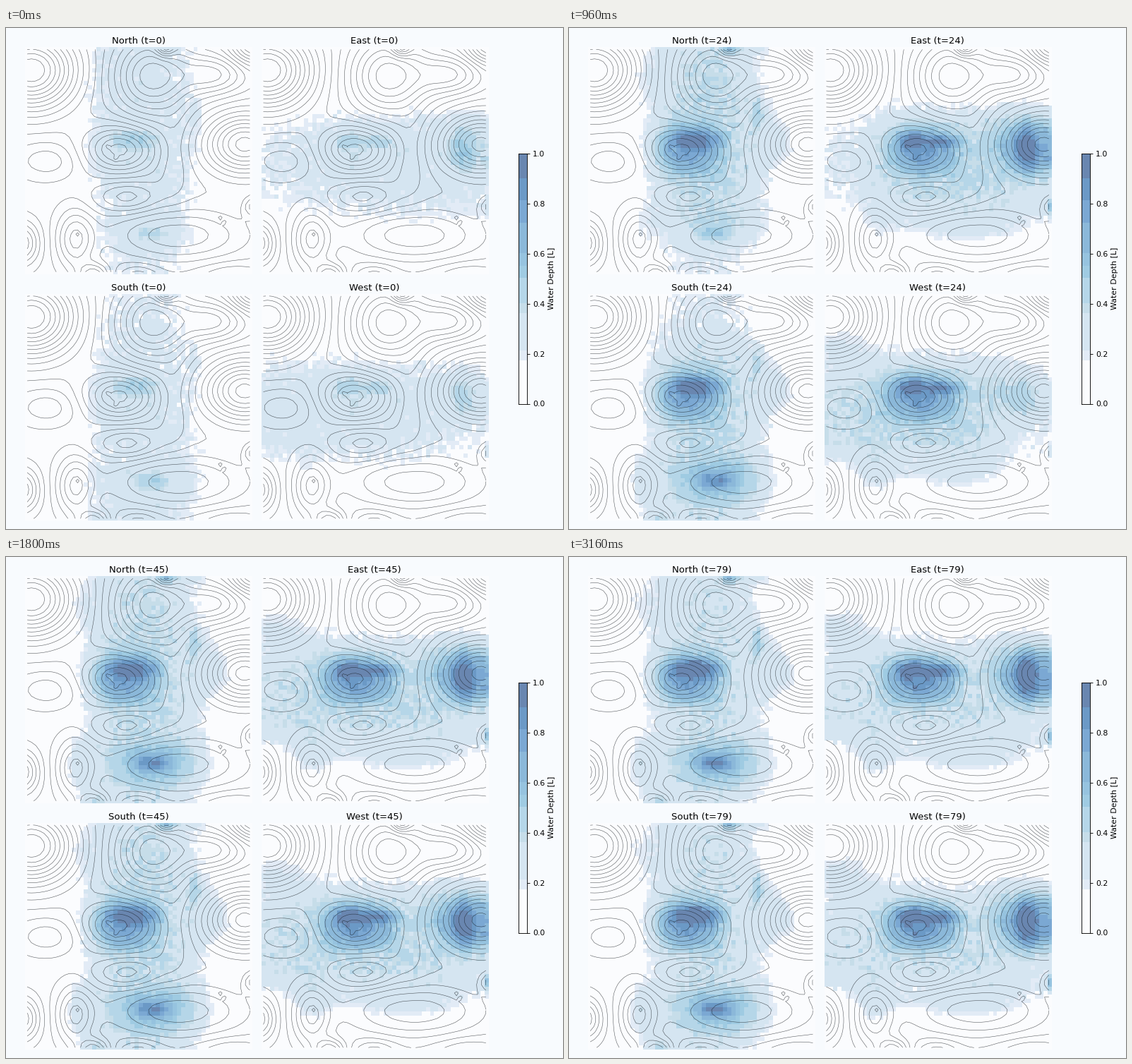
Animation of 789 by 710 pixels, one loop 3200 ms. Source, as a matplotlib script:

```python
import numpy as np
import matplotlib.pyplot as plt
from matplotlib.animation import FuncAnimation
from matplotlib.colors import BoundaryNorm, ListedColormap

W, H, DPI = 789, 710, 80
N, CELL = 54, 5.95
SIZE = N * CELL
FRAMES, STEP = 80, 40
PT = 78.9 / DPI

EDGES = [0, .17, .21, .36, .40, .50, .55, .60, .72, .81, .90, 1.0]
CMAP = ListedColormap(['#fbfcfe', '#e2ebf6', '#d5e5f1', '#c6dde9', '#b5d6e8',
                       '#9fcbe2', '#96c3df', '#8bb8d9', '#7ba8d3', '#6b99c6',
                       '#6986b0'])
NORM = BoundaryNorm(EDGES, CMAP.N)

X, Y = np.meshgrid(30 + CELL * np.arange(N), 30.5 + CELL * np.arange(N))

# Hills and basins: x, y, rx, ry, height in contour intervals.
PLAIN = 3.5
LANDFORMS = [
    (36, 60, 62, 54, -11.5),
    (207, 68, 55, 55, 7.2),
    (226, 26, 13, 13, -4.5),
    (295, 66, 45, 28, 4.5),
    (350, 25, 30, 25, -6),
    (160, 172, 48, 32, -6),
    (238, 180, 22, 60, 1.5),
    (338, 165, 55, 42, -9),
    (58, 188, 45, 26, 2.2),
    (172, 240, 45, 22, 3.2),
    (244, 294, 100, 38, -4.2),
    (98, 300, 26, 42, -4.5),
    (22, 305, 24, 30, 5.5),
    (125, 350, 22, 16, -5),
    (188, 352, 28, 16, 2.5),
    (320, 352, 45, 18, 2),
    (350, 253, 14, 14, -3.5),
]
SINKS = [(23, 19), (26, 21), (40, 46), (41, 47), (44, 12)]

# Spots where the flow gathers: x, y, rx, ry.
GATHER_Y = [(182, 158, 36, 13), (206, 293, 24, 11), (267, 118, 9, 24)]
GATHER_X = [(148, 160, 20, 12), (195, 161, 26, 8), (312, 170, 16, 34),
            (347, 255, 6, 14)]


def bump(x, y, rx, ry, power=2):
    return np.exp(-np.hypot((X - x) / rx, (Y - y) / ry) ** power)


def smooth(a, sigma=9):
    i = np.arange(N)
    k = np.exp(-(i[:, None] - i) ** 2 / (2 * sigma ** 2))
    k /= k.sum(1, keepdims=True)
    return k @ a @ k.T


def terrain():
    z = PLAIN + sum(h * bump(*form) for *form, h in LANDFORMS)
    for cell in SINKS:
        level = np.floor(z[cell])
        z[cell] = level - .8 * (z[cell] - level)
    return z


class Storm:
    """Rain crossing the terrain in one direction, then slow pooling."""

    def __init__(self, z, vertical, sign):
        shift = -35 * sign
        if vertical:
            axis, spots = Y, GATHER_Y
            self.first = bump(194, 188 + shift, 92, 290, 3)
            self.full = bump(195, 188, 92, 290, 3)
        else:
            axis, spots = X, GATHER_X
            self.first = bump(188 + shift, 193, 290, 90, 3)
            self.full = bump(188, 193, 290, 92, 3)
        s = (axis - axis.min()) / np.ptp(axis)
        if sign < 0:
            s = 1 - s
        self.arrival = 4 + 32 * s ** 1.8
        low = smooth(z) - z
        wet = self.full ** .5
        self.hollow = np.clip(.07 * low, -.08, .34) * wet
        self.spots = .27 * sum(bump(*p, 3) for p in spots) * wet
        grain = np.random.default_rng(7 + vertical).normal(size=(N, N))
        self.grain = grain * np.where(low < 0, .035, .02) * wet

    def depth(self, t):
        g = np.clip((t - self.arrival + 8) / 16, 0, 1)
        g = g * g * (3 - 2 * g)
        late = np.clip((t - 32) / 47, 0, 1)
        rain = (.29 * self.first * (1 - g)
                + .50 * self.full * g * (1 - .06 * late))
        pools = self.hollow * (.2 + .8 * g) + self.spots * (.55 + .45 * g)
        return np.clip(rain + pools * (1 + .2 * late) + self.grain, 0, .999)


def px_axes(x, y, w, h):
    return fig.add_axes([x / W, 1 - (y + h) / H, w / W, h / H])


fig = plt.figure(figsize=(W / DPI, H / DPI), dpi=DPI, facecolor='#f8fbfe')
z = terrain()
levels = np.arange(np.floor(z.min()), np.ceil(z.max()) + 1)
panels = []
for name, x, y, vertical, sign in [('North', 27.1, 27.4, True, 1),
                                   ('East', 361.5, 27.4, False, -1),
                                   ('South', 27.1, 376.9, True, -1),
                                   ('West', 361.5, 376.9, False, 1)]:
    ax = px_axes(x, y, SIZE, SIZE)
    storm = Storm(z, vertical, sign)
    img = ax.imshow(storm.depth(0), cmap=CMAP, norm=NORM,
                    interpolation='nearest', aspect='auto')
    ax.contour(z, levels=levels, colors='#101418', linewidths=.5,
               linestyles='solid', alpha=.7)
    ax.axis('off')
    title = fig.text((x + SIZE / 2) / W, 1 - (y - 5.3) / H, '', ha='center',
                     va='baseline', fontsize=12 * PT)
    panels.append((name, storm, img, title))

bar = px_axes(726.3, 178, 11.8, 354.5)
bar.imshow(np.linspace(.999, 0, 355)[:, None], cmap=CMAP, norm=NORM,
           extent=(0, 1, 0, 1), aspect='auto', interpolation='nearest')
bar.set_xticks([])
bar.yaxis.tick_right()
bar.yaxis.set_label_position('right')
bar.set_yticks(np.linspace(0, 1, 6))
bar.tick_params(labelsize=10 * PT)
bar.set_ylabel('Water Depth [L]', fontsize=10 * PT)


def update(t):
    for name, storm, img, title in panels:
        img.set_data(storm.depth(t))
        title.set_text(f'{name} (t={t})')
    return [artist for p in panels for artist in p[2:]]


anim = FuncAnimation(fig, update, frames=FRAMES, interval=STEP,
                     init_func=lambda: update(0), repeat=True,
                     repeat_delay=0, blit=False)
plt.show()
```
